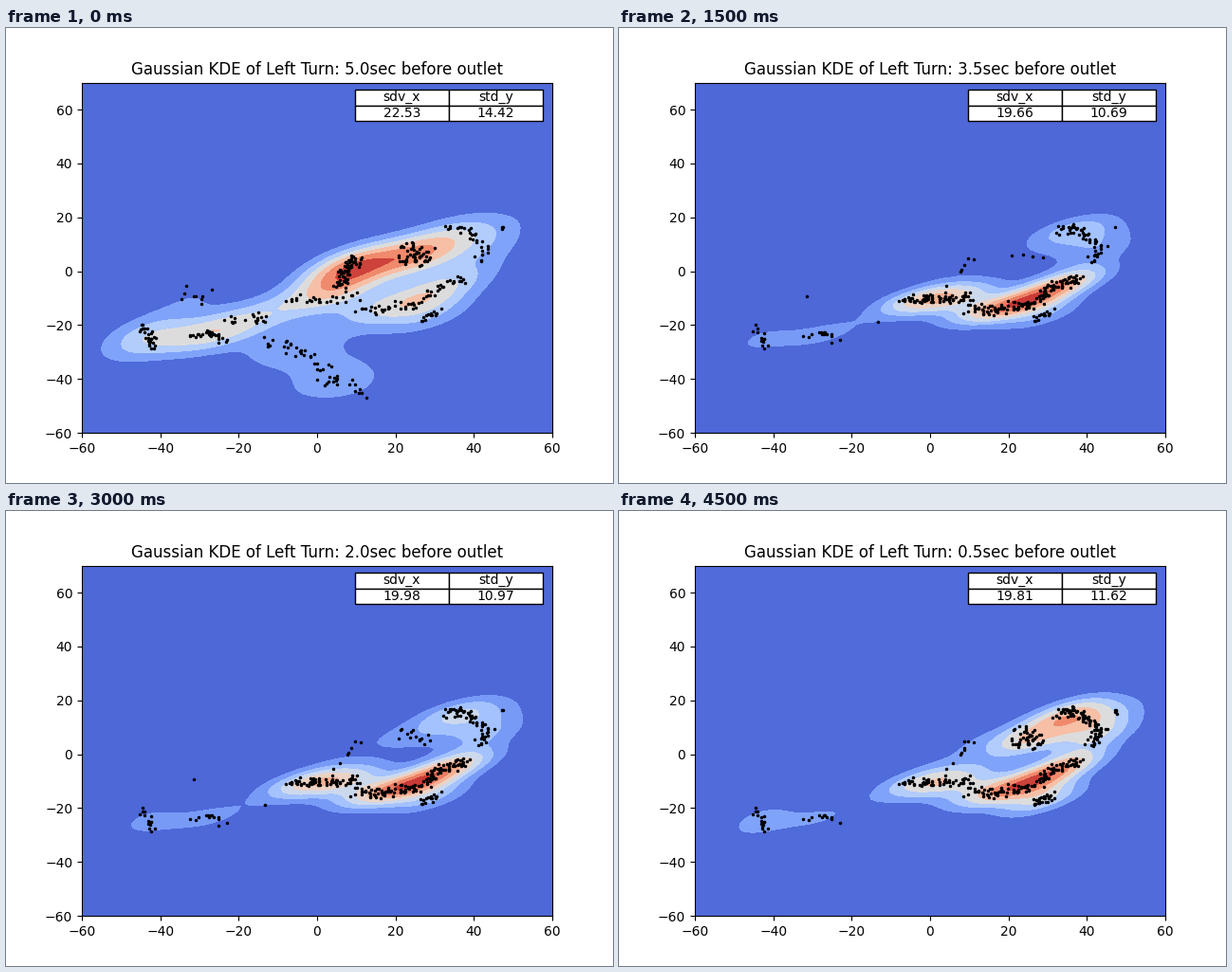
A matplotlib script that plays this animation: 640x480 px, repeating every 5 s.

```python
import numpy as np
import matplotlib.pyplot as plt
from matplotlib.animation import FuncAnimation

FRAMES, INTERVAL = 10, 500
XLIM, YLIM = (-60, 60), (-60, 70)
TURN = 3            # step at which the early traffic has cleared
GOLDEN = 0.618034

# Each lane: key points, spread, vehicle counts at the start, the turn, the end.
LANES = [
    ([(-45, -20), (-42.5, -25), (-41.8, -28)], 0.7, (30, 14, 17)),
    ([(-33, -24), (-28, -23), (-26.5, -23), (-23, -26)], 0.6, (28, 14, 11)),
    ([(-34, -5), (-30, -11)], 2.4, (9, 1, 0)),
    ([(-24, -19), (-16, -16), (-13, -20)], 1.4, (18, 1, 0)),
    ([(-14, -26), (-6, -28), (1, -34), (5, -42), (13, -45)], 1.5, (48, 0, 0)),
    ([(-7, -10.5), (10, -9.5)], 1.0, (24, 72, 55)),
    ([(6, -7), (7, -2), (8, 3), (11, 4)], 1.1, (64, 6, 9)),
    ([(10, -13), (18, -14), (26, -12), (32, -5), (38, -2.5)], 1.2, (56, 135, 115)),
    ([(27.5, -18.5), (31, -15)], 0.9, (14, 15, 28)),
    ([(24, 4), (27, 7)], 2.2, (50, 4, 46)),
    ([(32.5, 15), (37, 16.5), (40, 13), (44, 9), (41, 4)], 1.0, (30, 54, 88)),
    ([(47, 16.5), (47.5, 15.5)], 0.3, (3, 1, 5)),
]

# Figures read out in the table at some steps; the rest are in between.
STEPS = (0, 1, 2, 3, 5, 7, 9)
STD_X = (22.53, 22.57, 23.09, 19.66, 20.71, 19.26, 19.81)
STD_Y = (14.42, 13.41, 11.96, 10.69, 10.87, 11.08, 11.62)
LAYERS = (7, 6, 8, 8, 8, 8, 8, 8, 8, 7)

GX, GY = np.meshgrid(np.linspace(*XLIM, 100), np.linspace(*YLIM, 100))


def count(start, turn, end, step):
    early = max(0, 1 - step / TURN) ** 2
    late = max(0, (step - TURN) / (FRAMES - 1 - TURN)) ** 2
    return round(turn + (start - turn) * early + (end - turn) * late)


def lane_points(path, spread, n, seed):
    """The first n vehicles of a lane, evenly strewn along its path."""
    rng = np.random.default_rng(seed)
    jitter = np.clip(rng.normal(size=(150, 2)), -2, 2)[:n] * spread
    u = (0.5 + GOLDEN * np.arange(n)) % 1 * (len(path) - 1)
    x, y = np.transpose(path)
    knots = np.arange(len(path))
    return np.column_stack([np.interp(u, knots, x), np.interp(u, knots, y)]) + jitter


def vehicles(step):
    return np.vstack([lane_points(path, spread, count(*counts, step), seed)
                      for seed, (path, spread, counts) in enumerate(LANES)])


def density(pts, sx, sy):
    """Gaussian KDE with Scott's bandwidth."""
    rho = np.corrcoef(pts.T)[0, 1]
    h = len(pts) ** (-1 / 6)
    u = (GX[..., None] - pts[:, 0]) / (sx * h)
    v = (GY[..., None] - pts[:, 1]) / (sy * h)
    q = (u * u - 2 * rho * u * v + v * v) / (1 - rho * rho)
    return np.exp(-q / 2).sum(axis=-1)


fig, ax = plt.subplots(figsize=(6.4, 4.8), dpi=100)


def draw(step):
    ax.clear()
    sx, sy = np.interp(step, STEPS, STD_X), np.interp(step, STEPS, STD_Y)
    pts = vehicles(step)
    z = density(pts, sx, sy)
    levels = np.linspace(0, z.max() / 0.94, LAYERS[step] + 1)
    ax.contourf(GX, GY, z, levels=levels, cmap="coolwarm")
    ax.plot(pts[:, 0], pts[:, 1], "k.", markersize=3)

    table = ax.table(cellText=[[f"{sx:.2f}", f"{sy:.2f}"]],
                     colLabels=["sdv_x", "std_y"], colWidths=[0.2, 0.2],
                     cellLoc="center", loc="upper right")
    table.set_zorder(3)

    ax.set(xlim=XLIM, ylim=YLIM,
           xticks=range(-60, 61, 20), yticks=range(-60, 61, 20))
    ax.set_title(f"Gaussian KDE of Left Turn: {5 - step / 2:.1f}sec before outlet")
    return []


anim = FuncAnimation(fig, draw, frames=FRAMES, interval=INTERVAL, repeat=True)
plt.show()
```
